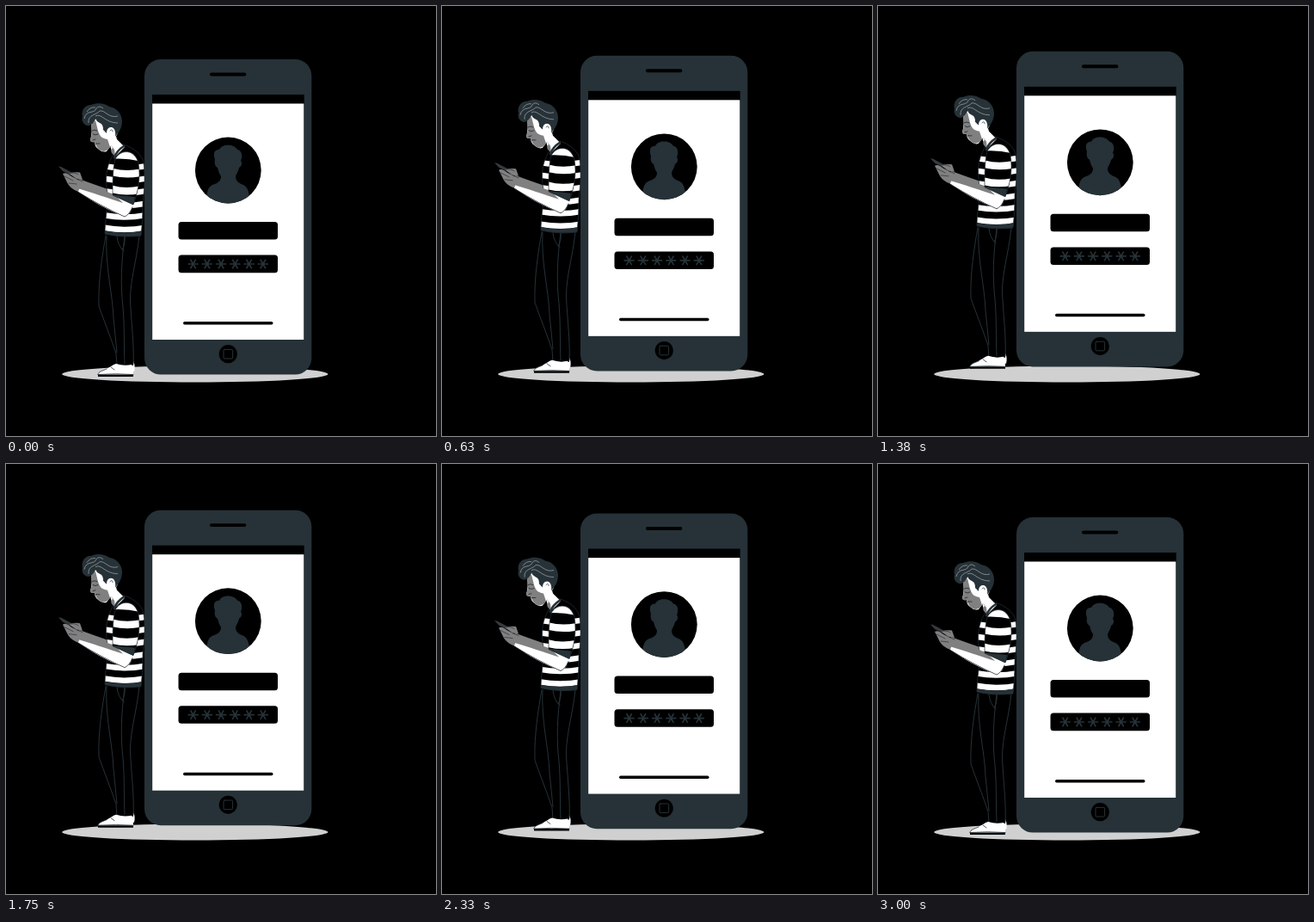
An HTML page that plays this animation: 500x500 px, repeating every 3040 ms.

```html
<!DOCTYPE html>
<html lang="en">
<head>
<meta charset="utf-8">
<title>Login float</title>
<style>
  html, body { margin: 0; width: 100%; height: 100%; overflow: hidden; background: #000; }
  svg { display: block; width: 100vw; height: 100vh; }
  .dark { fill: #263238; }
  .white { fill: #fff; }
  .grey { fill: #808080; }
  .line { fill: none; stroke: #263238; stroke-linecap: round; stroke-linejoin: round; }
  .stripes { fill: none; stroke: #fff; }
</style>
</head>
<body>
<svg viewBox="0 0 500 500">
  <defs>
    <clipPath id="avatar"><circle cx="258.3" cy="191" r="38.4"/></clipPath>
    <clipPath id="torso"><path id="torsoShape" d="M126 170L136 161C147 164 158 172 160 182C162 198 161 213 159 229C159 246 158 257 157 267C143 269 128 268 115 265C115 250 118 235 119 222C115 207 116 190 121 180Z"/></clipPath>
    <clipPath id="sleeve"><path id="sleeveShape" d="M127 178C133 166 150 166 154 183C157 200 153 218 148 231L124 220C124 205 124 190 127 178Z"/></clipPath>
  </defs>

  <ellipse cx="219.8" cy="428" rx="154.7" ry="9.5" fill="#d0d0d0"/>

  <g id="floating">
    <!-- legs and shoes -->
    <path d="M145 413H148C150 417 150 421 149 425H143Z" class="white"/>
    <path d="M116 265C112 288 107 318 108 349L128 404L129 418H148C149 400 147 382 147 360C143 332 153 306 156 265Z"/>
    <g class="line" stroke-width="1">
      <path d="M116 267C112 290 107 320 108 349C114 366 122 386 128 404L129 417"/>
      <path d="M117 267C115 302 124 334 125 363L129 403"/>
      <path d="M138 268C134 298 133 325 136 350C138 375 137 396 138 416"/>
      <path d="M155 267C152 298 142 325 145 352C147 380 149 400 148 416"/>
      <path d="M129 268Q130 279 137 285M138 268Q139 278 135 283"/>
    </g>
    <path d="M107 430C106 426 112 424 117 422C121 420 124 417 128 416Q137 419 146 417C148 421 148 426 148 430Z" class="white"/>
    <path d="M107 428.500H148V431H107Z"/>
    <path d="M107 428.500C107 425 113 424 117 422M122 420L126 423M107 428.500Q128 427 148 428.500" class="line" stroke-width=".8"/>

    <!-- far arm -->
    <path d="M85 201C97 206 111 210 124 215L130 225L83 210Z" class="grey"/>

    <!-- shirt -->
    <use href="#torsoShape"/>
    <g clip-path="url(#torso)">
      <g class="stripes" stroke-width="6.5">
        <path id="band" d="M113 186Q137 191 163 186"/>
        <use href="#band" y="14.5"/>
        <use href="#band" y="29"/>
        <use href="#band" y="43.500"/>
        <use href="#band" y="57"/>
        <use href="#band" y="71.500"/>
      </g>
      <path d="M113 261Q136 266 160 261V270H113Z" class="dark"/>
    </g>
    <use href="#torsoShape" class="line" stroke-width=".7"/>

    <!-- neck -->
    <path d="M121 151L127 148L129 155L138 164L127 175Q122 170 121 160Z" class="white"/>
    <path d="M121 160L124 165Q121 168 123 171L127 175L126 167Z" class="grey"/>
    <path d="M137 163Q129 168 126 176" class="line" stroke-width="2.6"/>

    <!-- near arm -->
    <path d="M84 207C100 212 113 217 126 221L148 228C147 237 143 244 138 245C118 237 100 227 84 216Z" class="white"/>
    <path d="M84 205C99 210 114 215 126 219L136 229C117 223 101 217 83 212Z" class="grey"/>
    <path d="M85 217Q113 234 138 245Q143 243 147 234" class="line" stroke-width=".8"/>
    <use href="#sleeveShape"/>
    <g clip-path="url(#sleeve)">
      <g class="stripes" stroke-width="8.500">
        <path d="M120 172Q139 170 159 175" stroke-width="12"/>
        <path d="M120 192Q139 198 160 193"/>
        <path d="M120 212Q138 218 159 213"/>
      </g>
      <path d="M122 219L150 222L148 233L134 227Z" class="dark"/>
    </g>
    <use href="#sleeveShape" class="line" stroke-width=".7"/>

    <!-- hands and handset -->
    <path d="M66 195C69 193 72 195 76 198L88 204L84 216Q76 213 72 207Z" class="grey"/>
    <path d="M61 186.500L64 187L85 198L83 200L66 192Z" fill="#343a3d"/>
    <path d="M73 194.500Q80 192.500 86 193.500L89 202L82 201Z" class="grey"/>
    <path d="M74 194.500Q80 193 84 196M68 198L78 203M73 206L82 207M82 201L89 204" class="line" stroke-width=".7"/>

    <!-- head -->
    <path d="M99 137C100 143 100 149 98 156Q99 159 103 158Q103 163 107 166Q112 171 117 169L123 161L130 148L126 130L108 126Z" class="white"/>
    <path d="M99 138L104 133L107 145C109 151 111 154 118 155L121 164Q116 171 110 168Q105 165 103 158Q98 159 98 156Q101 149 99 138Z" class="grey"/>
    <path d="M100 145Q103 143 106 145M101 149Q104 151 107 149M104 160L109 160M101 156L104 155" class="line" stroke-width=".9"/>
    <path d="M97 139C92 140 87 135 89 129C87 121 92 115 99 115C106 112 115 113 120 117C128 118 135 125 135 134C135 142 131 147 127 152C128 146 126 141 122 141C118 141 117 145 117 148L113 144Q113 137 109 136Q105 134 104 131Q103 136 97 139Z" class="dark"/>
    <path d="M118 146C118 140 126 140 126 145C126 149 122 153 119 151Z" class="white"/>
    <path d="M121 145Q124 142 124 146" class="line" stroke-width=".7"/>
    <path d="M91 131C93 120 103 126 105 119Q108 115 113 119M96 136C95 126 105 127 109 122C116 121 119 131 130 128M104 128C111 124 115 136 130 136M94 123Q98 117 104 118" fill="none" stroke="#aeb4b7" stroke-width=".65"/>

    <!-- phone -->
    <rect x="161" y="62" width="194.300" height="366.600" rx="19" class="dark"/>
    <rect x="170" y="103" width="176.700" height="11"/>
    <rect x="170.200" y="113.500" width="176" height="274.500" class="white"/>
    <rect x="237" y="77.500" width="42.300" height="3.900" rx="1.950"/>
    <circle cx="258.300" cy="191" r="38.400"/>
    <g clip-path="url(#avatar)" class="dark">
      <path d="M243 179C241 173 241 167 248 167C251 160 265 160 269 167C275 168 275 176 273 180C275 182 274 187 271 188C270 193 268 195 267 198C267 204 271 206 276 208C282 211 283 218 284 232H233C233 218 234 211 240 208C246 206 250 204 250 198C248 195 247 192 246 188C243 187 242 182 243 179Z"/>
    </g>
    <rect x="200.500" y="251" width="115.500" height="20.500" rx="3.500"/>
    <rect x="200.500" y="289.600" width="115.500" height="20.600" rx="3.500"/>
    <path id="stars" class="line" stroke-width="1.700"/>
    <rect x="206" y="367" width="104.500" height="3.500" rx="1.750"/>
    <circle cx="258.300" cy="404.700" r="10.600"/>
    <rect x="253" y="399.400" width="10.600" height="10.600" rx="1" class="line" stroke-width="1"/>
  </g>
</svg>
<script>
  const LOOP = 3040, STEPS = 73, LIFT = 10;
  const LEAD = 4; // steps land on the nearest 10 ms, up to this much early
  const floating = document.getElementById('floating');

  // One asterisk: three strokes crossing at 60 degrees.
  function asterisk(cx, cy, r) {
    return [0, 1, 2].map(k => {
      const dx = r * Math.cos(k * Math.PI / 3), dy = r * Math.sin(k * Math.PI / 3);
      return `M${cx - dx} ${cy - dy}L${cx + dx} ${cy + dy}`;
    }).join('');
  }
  document.getElementById('stars').setAttribute('d',
    Array.from({ length: 6 }, (_, i) => asterisk(217.6 + i * 16.25, 300, 5.5)).join(''));

  // Linear rise and fall at 24 steps per second.
  function draw(time) {
    const step = Math.floor(((time + LEAD) % LOOP) / LOOP * STEPS);
    const phase = step / (STEPS - 1);
    const y = -LIFT * (1 - Math.abs(1 - 2 * phase));
    floating.setAttribute('transform', `translate(0 ${y.toFixed(3)})`);
  }

  const start = performance.now();
  function tick() {
    draw(performance.now() - start);
    requestAnimationFrame(tick);
  }
  tick();
</script>
</body>
</html>
```
